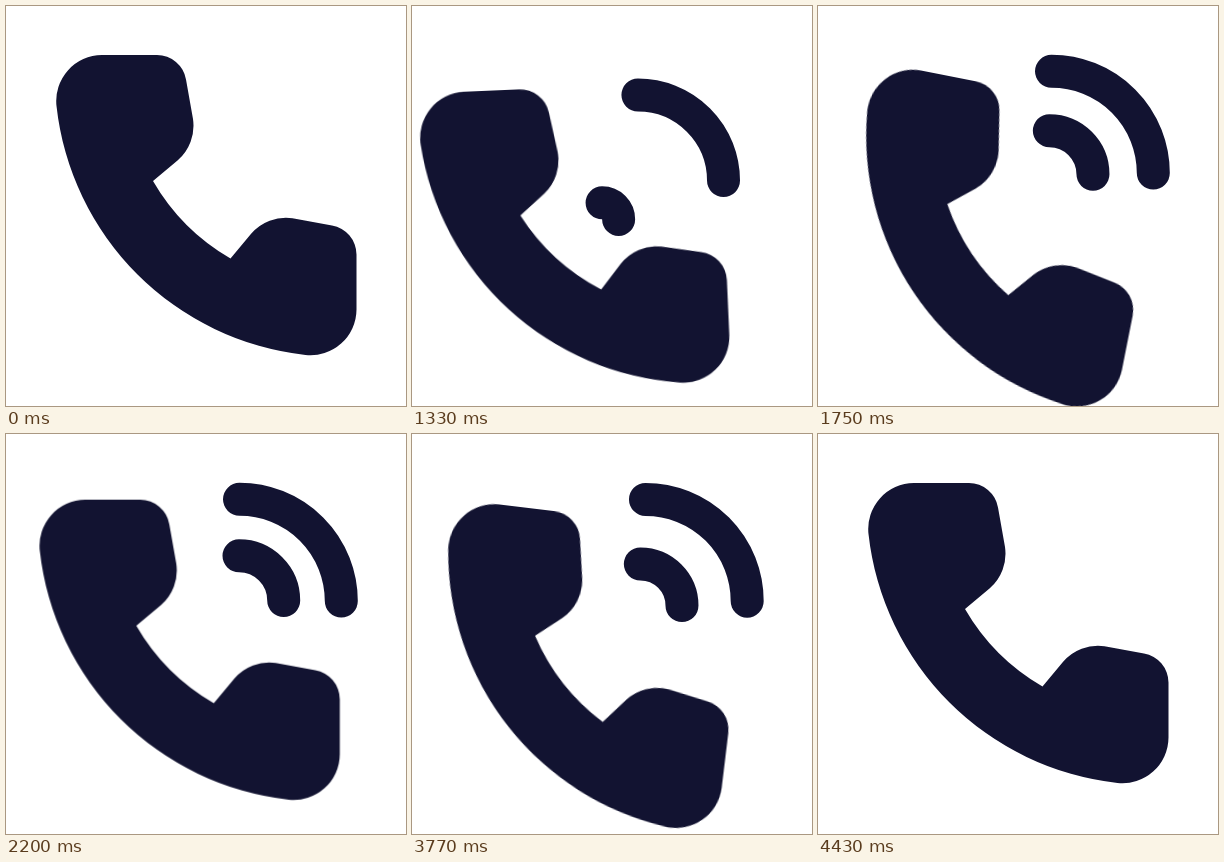
Write an HTML page without scripts that moves like this. It is 400 by 400 pixels and loops after 4460 ms.

```html
<!DOCTYPE html>
<html lang="en">
<head>
<meta charset="utf-8">
<title>Ringing phone</title>
<style>
  html, body { margin: 0; width: 100%; height: 100%; overflow: hidden; background: #fff; }
  svg { display: block; width: 400px; height: 400px; }

  /* One ring plays forward, rests, then plays backward. */
  .move, .turn, .wave {
    animation: 2230ms linear -3975ms infinite alternate both;
  }
  .move { animation-name: move; }
  .turn { animation-name: turn; transform-origin: 172.5px 226.5px; }
  .wave { fill: none; stroke: #121331; stroke-width: 33; stroke-linecap: round; }
  .far  { animation-name: far, show-far; }
  .near { animation-name: near, show-near; }

  @keyframes move {
    0%, 23.76% { transform: translate(0, 0); }
    23.77%, 24.44% { transform: translate(-2.2px, .4px); }
    28.48% { transform: translate(-27px, 27px); animation-timing-function: ease-out; }
    33.86% { transform: translate(-35px, 34.5px); }
    37.89% { transform: translate(-36.4px, 33.3px); }
    47.31% { transform: translate(-33px, 32.5px); }
    56.73% { transform: translate(-28.2px, 27.1px); animation-timing-function: cubic-bezier(.3, .3, .5, 1); }
    71.5% { transform: translate(-17.5px, 17.5px); }
    76.9%, 100% { transform: translate(-16.7px, 16.7px); }
  }
  @keyframes turn {
    0%, 23.76% { transform: rotate(0deg); }
    23.77%, 24.44% { transform: rotate(-5.3deg); animation-timing-function: ease-out; }
    28.48% { transform: rotate(-10.3deg); animation-timing-function: ease-in-out; }
    33.86% { transform: rotate(9deg); animation-timing-function: ease-in; }
    37.89% { transform: rotate(-2.4deg); animation-timing-function: ease-out; }
    43.27% { transform: rotate(-9.5deg); animation-timing-function: ease-in; }
    47.31% { transform: rotate(-7deg); }
    52.69% { transform: rotate(7deg); animation-timing-function: ease-out; }
    56.73% { transform: rotate(11.2deg); animation-timing-function: ease-in-out; }
    71.5% { transform: rotate(.4deg); }
    76.9%, 100% { transform: rotate(0deg); }
  }
  @keyframes far {
    0%, 24.44% {
      d: path("M193.5 190.5A16 16 0 0 1 209.5 206.5");
      animation-timing-function: cubic-bezier(.2, .2, .2, 1);
    }
    54%, 100% { d: path("M233.5 65.3A101.8 101.8 0 0 1 335.3 167.1"); }
  }
  @keyframes near {
    0%, 37.89% {
      d: path("M190 197A16.5 16.5 0 0 1 206.5 213.5");
      animation-timing-function: cubic-bezier(.2, .2, .2, 1);
    }
    64%, 100% { d: path("M233 121.8A44.7 44.7 0 0 1 277.7 166.5"); }
  }
  @keyframes show-far {
    0%, 23.76% { opacity: 0; }
    23.77%, 100% { opacity: 1; }
  }
  @keyframes show-near {
    0%, 35.86% { opacity: 0; }
    35.87%, 100% { opacity: 1; }
  }
</style>
</head>
<body>
<svg viewBox="0 0 400 400">
  <g class="move">
    <path class="turn" fill="#121331" d="M96 49H151A29.5 29.5 0 0 1 180 73.5L187 113
      A46 46 0 0 1 171.5 154.6L147 175A212 212 0 0 0 224.5 252.5L244.9 228
      A46 46 0 0 1 286.5 212.2L326 219.5A29.5 29.5 0 0 1 350.5 248.5V303.5
      A46 46 0 0 1 299.5 349A281.5 281.5 0 0 1 50.5 100A46 46 0 0 1 96 49Z"/>
  </g>
  <path class="wave far" d="M193.5 190.5A16 16 0 0 1 209.5 206.5"/>
  <path class="wave near" d="M190 197A16.5 16.5 0 0 1 206.5 213.5"/>
</svg>
</body>
</html>
```
